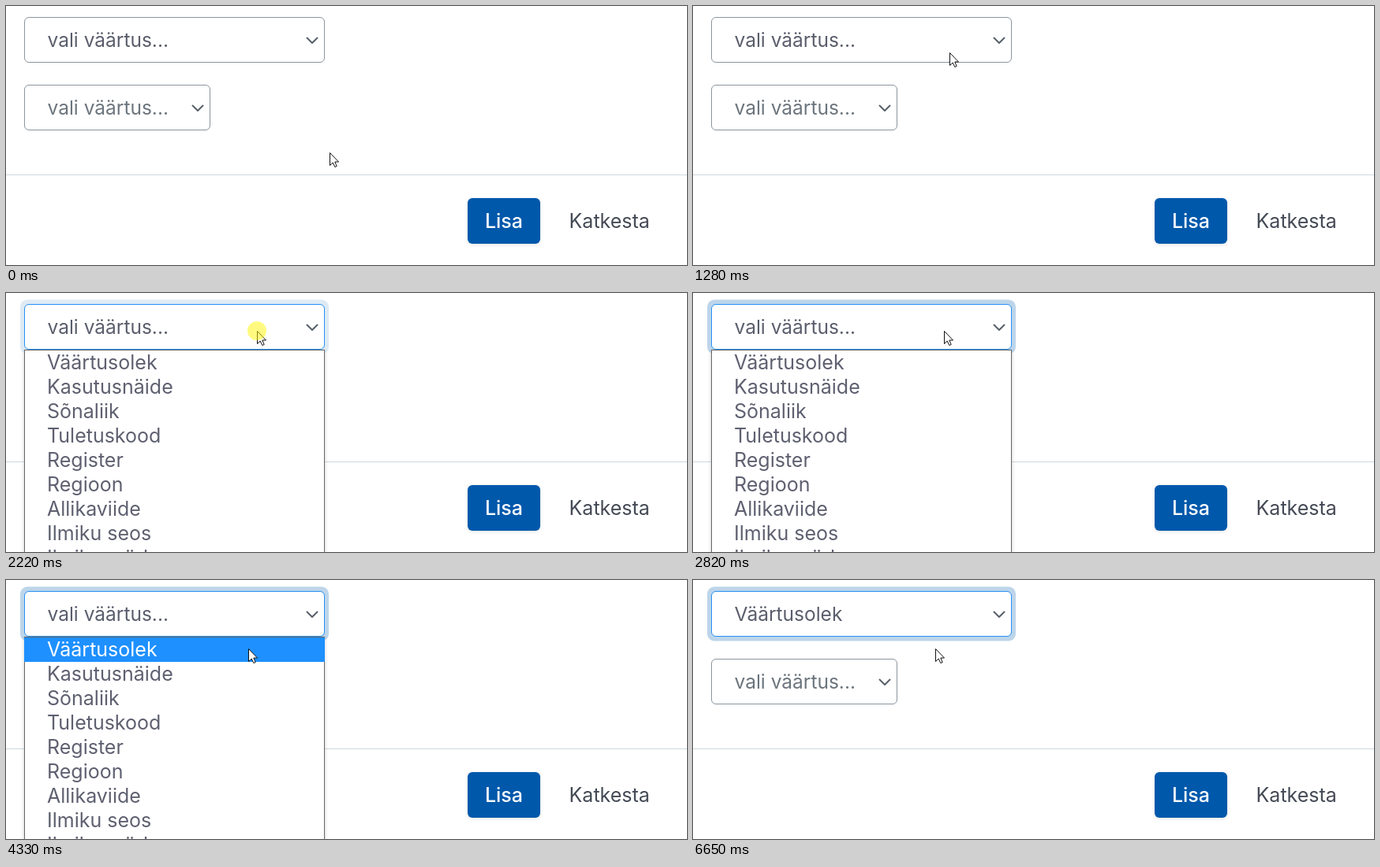
Animation of 863 by 329 pixels, one loop 6.78 s. Source, as an HTML page:

```html
<!DOCTYPE html>
<html lang="et">
<head>
<meta charset="utf-8">
<title>Vali väärtus</title>
<style>
  html, body { margin: 0; width: 100%; height: 100%; overflow: hidden; background: #fff; }
  svg { display: block; width: 100vw; height: 100vh; font-family: Inter, sans-serif; font-size: 24.5px; }
  .box { fill: #fff; stroke: #8a949e; }
  .chevron { fill: none; stroke: #59616b; stroke-width: 2; stroke-linecap: round; stroke-linejoin: round; }
  .button { font-size: 25px; text-anchor: middle; }
  #rows { font-size: 25px; fill: #5e6070; }
  .panel { fill: #fff; stroke: #666; filter: drop-shadow(0 2px 2px rgba(0, 0, 0, .2)); }
  .blue { fill: #0058ab; filter: drop-shadow(0 1px 2px rgba(0, 0, 0, .12)); }
</style>
</head>
<body>
<svg viewBox="0 0 863 329">
  <rect width="863" height="329" fill="#fff"/>
  <path d="M0 214.5H863" stroke="#cdd9e0"/>

  <rect id="ring" x="18" y="8.5" width="391" height="69" rx="9" fill="#bdd5ea"/>
  <rect id="field" class="box" x="23.5" y="14.5" width="380" height="57" rx="5.5"/>
  <text id="value" x="52.5" y="52" fill="#5a5e6c"></text>
  <path class="chevron" d="M381.5 40.5l6.5 6.5 6.5-6.5"/>

  <rect class="box" x="23.5" y="100.5" width="235" height="57" rx="5.5"/>
  <text x="52.5" y="138" fill="#6c757d">vali väärtus...</text>
  <path class="chevron" d="M236.5 126.5l6.5 6.5 6.5-6.5"/>

  <rect class="blue" x="585" y="244" width="92" height="58" rx="6"/>
  <text class="button" x="631" y="282" fill="#fff" font-weight="500">Lisa</text>
  <text class="button" x="764.7" y="282" fill="#444a55">Katkesta</text>

  <g id="menu">
    <rect class="panel" x="23.5" y="72.5" width="380" height="300"/>
    <rect id="mark" x="23" y="73" width="381" height="31" fill="#1e90ff"/>
    <g id="rows"></g>
  </g>

  <path id="cursor" d="M.5 .5V16.5L4.2 13L6.8 18.5L9.2 17.5L6.8 12H11.5Z" fill="#fff" stroke="#111" stroke-linejoin="round"/>
  <circle id="click" r="12" fill="#fff500" fill-opacity=".5"/>
</svg>
<script>
const LOOP = 6780, TICK = 70;
const OPEN = 2220, HOVER = 4050, PICK = 6650;
const options = ['Väärtusolek', 'Kasutusnäide', 'Sõnaliik', 'Tuletuskood', 'Register',
  'Regioon', 'Allikaviide', 'Ilmiku seos', 'Ilmiku märkus'];
const $ = id => document.getElementById(id);
const show = (el, on) => el.setAttribute('visibility', on ? 'visible' : 'hidden');
const between = (t, a, b) => t >= a && t < b;

const rows = options.map((label, i) => {
  const row = document.createElementNS('http://www.w3.org/2000/svg', 'text');
  row.setAttribute('x', 52);
  row.setAttribute('y', 97 + 31 * i);
  row.textContent = label;
  $('rows').append(row);
  return row;
});

// Each move: start time, number of ticks, end point, time warp
const home = [410, 186];
const moves = [
  { at: 720, ticks: 10, to: [323, 55], warp: 1 },
  { at: 1480, ticks: 4, to: [318, 48], warp: 1 },
  { at: 3630, ticks: 11, to: [307, 87], warp: .9 }
];

function cursorAt(t) {
  let pos = home;
  for (const { at, ticks, to, warp } of moves) {
    if (t < at) break;
    const step = Math.min(ticks, Math.floor((t - at) / TICK) + 1);
    const u = Math.pow(step / ticks, warp);
    const k = u * u * (3 - 2 * u);
    pos = pos.map((v, i) => Math.round(v + (to[i] - v) * k));
  }
  return pos;
}

function draw(t) {
  const [x, y] = cursorAt(t);
  const place = `translate(${x} ${y})`;
  const focused = t >= OPEN;
  const hover = between(t, HOVER, PICK);

  $('cursor').setAttribute('transform', place);
  $('click').setAttribute('transform', place);
  show($('click'), between(t, 2150, 2820) || between(t, 5660, PICK));

  $('ring').setAttribute('opacity', !focused ? 0 : t < OPEN + TICK ? .5 : 1);
  $('field').style.stroke = focused ? '#2490f5' : '';
  $('value').textContent = t >= PICK ? options[0] : 'vali väärtus...';

  show($('menu'), between(t, OPEN, PICK));
  show($('mark'), hover);
  rows[0].setAttribute('fill', hover ? '#fff' : '#5e6070');
}

const start = performance.now();
function frame() {
  draw((performance.now() - start) % LOOP);
  requestAnimationFrame(frame);
}
frame();
</script>
</body>
</html>
```
